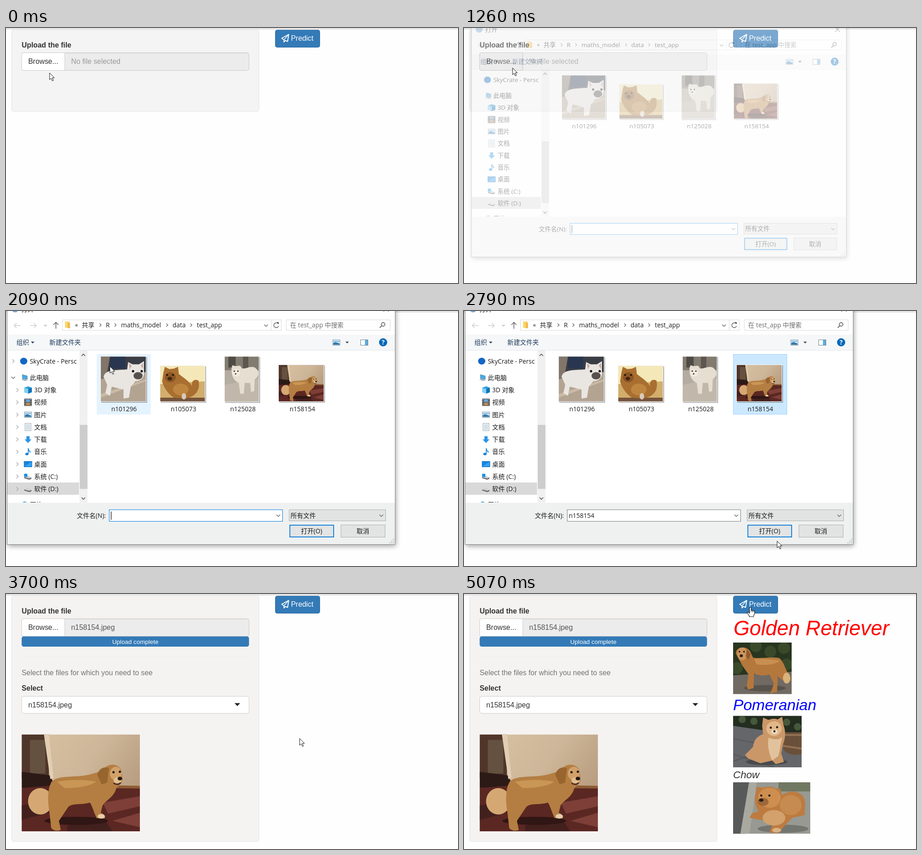
Recreate the animation shown at these times as an HTML page. Size 996 by 562 pixels, loop 9.05 s.

```html
<!DOCTYPE html>
<html lang="en">
<head>
<meta charset="utf-8">
<title>Dog breed predictor</title>
<style>
html, body { margin: 0; width: 100%; height: 100%; overflow: hidden; background: #fefefe; }
#stage { display: block; width: 100%; height: 100%; }
text { white-space: pre; }
.page { font-family: "Liberation Sans", Arial, sans-serif; font-size: 15.88px; fill: #333; }
.win { font-family: "Open Sans", "Noto Sans CJK SC", "Noto Sans CJK", sans-serif; font-size: 13.9px; fill: #1a1a1a; }
</style>
</head>
<body>
<svg id="stage" viewBox="0 0 996 562" xmlns="http://www.w3.org/2000/svg"></svg>
<script>
const LOOP = 9050;
const rect = (x, y, w, h, fill, more = '') =>
  `<rect x="${x}" y="${y}" width="${w}" height="${h}" fill="${fill}" ${more}/>`;
const text = (x, y, s, more = '') => `<text x="${x}" y="${y}" ${more}>${s}</text>`;
const shape = (d, fill, more = '') => `<path d="${d}" fill="${fill}" ${more}/>`;
const stroke = (d, color, w = 1, more = '') => shape(d, 'none', `stroke="${color}" stroke-width="${w}" ${more}`);
const oval = (x, y, rx, ry, fill, more = '') =>
  `<ellipse cx="${x}" cy="${y}" rx="${rx}" ry="${ry}" fill="${fill}" ${more}/>`;
const group = (id, body, more = '') => `<g id="${id}" ${more}>${body}</g>`;
const dots = (fill, r, ...pts) => pts.map(p => oval(p[0], p[1], r, r, fill)).join('');

// Simplified pictures, each in its own coordinate box
const pics = {
  bulldog: [99, 98,
    rect(0, 0, 99, 98, '#b3a391') + shape('M0 0H99V34L0 44Z', '#3b3d45') + rect(20, 0, 34, 26, '#29364f') +
    shape('M0 0H20L12 46 0 50Z', '#82766a') + shape('M0 82L99 50V54L0 90Z', '#c9baa5') +
    shape('M6 44C10 28 34 30 58 28L60 12 70 17 84 17 95 10 95 32C97 46 88 54 76 54L66 66 62 90 50 92 50 72 24 66 20 86 10 80 14 62Z', '#e9e6e2') +
    shape('M62 15L68 20 64 28ZM93 14L88 20 93 27Z', '#c9a6a0') + oval(82, 42, 10, 8, '#57504f') + dots('#15110f', 2.6, [71, 32], [90, 32])],
  spitz: [98, 78,
    rect(0, 0, 98, 78, '#f4e8b8') + shape('M0 40L98 34V78H0Z', '#d2ae6c') + rect(0, 70, 98, 8, '#76533a') +
    shape('M7 14L10 2 20 7 30 6 39 2 41 18C54 28 64 34 70 45 68 34 74 28 84 32 88 48 82 62 68 68L56 72 30 70C20 64 8 50 4 34Z', '#a96f30') +
    oval(22, 25, 12, 11, '#8b5524') + oval(45, 52, 17, 13, '#bd853f') + oval(21, 28, 5, 4, '#412515') + dots('#160d08', 2, [15, 20], [28, 20]) + oval(52, 67, 5, 7, '#d8caba')],
  samoyed: [75, 99,
    rect(0, 0, 75, 99, '#b4aca0') + rect(0, 0, 75, 30, '#827b70') + rect(8, 0, 16, 24, '#4e4b45') + rect(40, 0, 12, 26, '#5c564e') +
    shape('M0 62L75 48V99H0Z', '#c1b8ab') +
    shape('M15 25L17 19 24 21 34 20 38 26C48 28 54 20 66 24 78 32 76 44 66 50L65 76 58 78 56 58 44 58 42 82 34 82 31 58C20 54 14 42 15 25Z', '#e6ded0') +
    oval(25, 36, 9, 8, '#f1eade') + dots('#2a2420', 1.6, [21, 32], [29, 32], [24, 38])],
  home: [260, 213,
    rect(0, 0, 260, 213, 'url(#wall)') + rect(0, 0, 60, 95, '#50352a') + rect(18, 12, 34, 74, '#65513f') +
    shape('M0 82L62 90 76 118H0Z', '#2c1a17') + shape('M49 0H60L70 96 63 98Z', '#e2cfb3') +
    shape('M0 118L70 112 260 117V213H0Z', '#5b2722') + shape('M68 109L260 113V119L68 116Z', '#8e5c36') +
    shape('M178 150L260 136V158L190 174ZM200 190L260 172V204Z', '#7d3f37') + shape('M0 156L60 148V172L0 188ZM100 200L180 185 200 213H100Z', '#42201e') +
    oval(120, 190, 70, 9, '#301614') + oval(41, 147, 27, 29, '#d5a873') +
    shape('M178 80C186 62 214 62 220 80L222 100C220 112 208 114 207 122 200 140 186 144 178 156L174 172Q187 178 182 185L165 184C158 170 155 156 150 150 130 156 112 150 102 160L82 190 86 210Q74 215 65 206L61 170C57 150 56 120 66 104 80 88 120 96 150 88Z', '#b47e42') +
    shape('M78 104Q122 96 164 104 144 118 94 118Z', '#c99655') + shape('M166 88Q174 68 192 74L188 106 176 110Z', '#98652f') +
    oval(207, 86, 13, 15, '#d1a169') + oval(211, 101, 9, 7, '#dfbd90') + oval(175, 180, 8, 5, '#e6cfad') +
    dots('#21130e', 2.5, [202, 83], [216, 82]) + oval(216, 97, 5, 4, '#241713') + stroke('M202 107Q211 113 218 106', '#512b25', 3)],
  golden: [129, 113,
    rect(0, 0, 129, 113, '#28351f') + dots('#394a2b', 13, [50, 8], [82, 20], [112, 12], [118, 48], [8, 56]) + shape('M0 72L129 64V113H0Z', '#716a62') +
    oval(70, 100, 46, 7, '#59534d') +
    shape('M6 24C6 8 30 6 38 20L44 33C64 36 84 30 102 34 112 42 114 58 126 76 130 88 120 90 108 82L98 74 97 108 82 112 90 90 80 70C66 74 56 72 46 68L45 100 33 103 30 96 34 70 20 50Z', '#b5783c') +
    shape('M46 36Q76 34 104 40 86 52 52 48Z', '#c98f51') + oval(118, 78, 8, 12, '#d9b27a') + oval(20, 25, 11, 14, '#cb955a') +
    shape('M30 15L39 25 34 38 28 30Z', '#935a2b') + dots('#22150f', 1.9, [14, 20], [24, 20]) + oval(18, 29, 3.5, 3, '#2a1a14')],
  pomeranian: [151, 113,
    rect(0, 0, 151, 113, '#65666a') + shape('M0 0H151V40L70 32 0 22Z', '#232d20') + dots('#45583a', 8, [20, 8], [46, 12], [118, 14], [142, 24]) +
    stroke('M0 50L151 80M0 84L90 113M0 100L150 46', '#55565a', 2) + shape('M108 36H151V84Q128 90 112 76Z', '#6a503a') + stroke('M108 42H151M110 66L151 72', '#927254', 4) +
    oval(74, 101, 46, 7, '#494a4d') +
    shape('M64 22L66 4 78 9Q90 4 98 8L108 2 111 20C116 34 116 48 110 62L106 82 112 101 94 106 86 98 60 104 34 94 26 86 44 68C46 50 56 44 66 40Z', '#ca9768') +
    shape('M78 48Q100 56 108 46L100 88 86 98Q74 72 78 48Z', '#e1c29d') + oval(90, 28, 17, 16, '#e1b789') + oval(91, 35, 7, 5, '#eedac0') +
    dots('#1a1411', 2.3, [83, 26], [97, 25], [91, 34])],
  chow: [170, 113,
    rect(0, 0, 170, 113, '#979992') + shape('M0 0H50L26 113H0Z', '#575a59') + shape('M35 0H52L36 113H16Z', '#aaa9a0') + rect(100, 0, 70, 20, '#707762') +
    oval(110, 102, 56, 9, '#73756f') +
    shape('M50 24L52 10 66 12Q82 6 94 14L104 14 108 28C122 18 146 16 156 34 162 50 156 62 158 72L130 78C118 90 108 104 96 112L80 110 88 90 68 84 36 78 42 68 56 64C48 52 46 38 50 24Z', '#bd7b40') +
    oval(80, 34, 25, 22, '#cd8e4f') + oval(127, 50, 24, 22, '#c68b51') + oval(90, 78, 25, 17, '#d2a16c') + oval(66, 43, 12, 9, '#9d6739') +
    oval(62, 39, 5, 3.5, '#251b17') + dots('#1e1713', 2.3, [62, 29], [80, 29]) + oval(96, 105, 10, 5, '#d9b185')]
};
function pic(name, x, y, w, h) {
  const [vw, vh, body] = pics[name];
  return `<svg x="${x}" y="${y}" width="${w}" height="${h}" viewBox="0 0 ${vw} ${vh}" preserveAspectRatio="none">${body}</svg>`;
}

const plane = shape('M607.5 22.5L623 14 620.5 29.5 615.5 27.5 612.5 31V26Z', 'none', 'stroke="#fff" stroke-width="1.9" stroke-linejoin="round"') +
  stroke('M612.5 26L622 15', '#fff', 1.6);
const bold = 'font-weight="bold"';

const page =
  rect(0, 0, 996, 3, '#f0f0f0') + rect(0, 1.5, 996, 1.5, '#d6d6d6') +
  rect(12.5, 4.5, 545, 179, '#f4f4f4', 'id="panel" rx="4" stroke="#e3e3e3"') +
  text(34.5, 42.5, 'Upload the file', bold) +
  rect(34.5, 54.5, 501, 39, '#ececec', 'rx="4" stroke="#c8c8c8"') + stroke('M131 56H534', '#dedede') +
  shape('M129.5 54.5H39Q34.5 54.5 34.5 59V89Q34.5 93.5 39 93.5H129.5Z', '#fff', 'id="browse" stroke="#ccc"') +
  text(49, 79, 'Browse...') + text(143.5, 79, 'No file selected', 'id="fileName" fill="#999"') +
  group('progress', rect(34.5, 93.5, 501, 22.5, '#337ab7', 'rx="4.5"') +
    text(285, 109.7, 'Upload complete', 'id="done" text-anchor="middle" font-size="13.6" fill="#fff"')) +
  group('details', stroke('M35 139.5H535', '#ececec') +
    text(34.5, 179, 'Select the files for which you need to see', 'fill="#737373"') + text(34.5, 213.3, 'Select', bold) +
    rect(34.5, 225.5, 501, 37.5, '#fff', 'rx="4" stroke="#ccc"') + text(49, 250, 'n158154.jpeg') +
    shape('M503.5 240.5H516L509.8 247Z', '#222') + pic('home', 34.5, 309.5, 260.5, 213.5)) +
  rect(593.5, 4.5, 98, 38, '#337ab7', 'id="predict" rx="4" stroke="#2e6da4"') + plane + text(628, 28, 'Predict', 'fill="#fff"') +
  group('results',
    text(594, 90.5, 'Golden Retriever', 'font-size="45.36" fill="#f00"') + pic('golden', 593, 107, 129, 113.5) +
    text(593, 256, 'Pomeranian', 'font-size="34" fill="#00f"') + pic('pomeranian', 593, 268.5, 151, 113.5) +
    text(593, 405.7, 'Chow', 'font-size="22.7"') + pic('chow', 593, 415, 170, 113.5), 'font-style="italic"');

// Dialog parts
const chev = (x, y, c, s = 4, w = 1.3) => stroke(`M${x - s / 2} ${y - s}l${s} ${s}l${-s} ${s}`, c, w);
const chevDown = (x, y, c, s = 4, w = 1.2) => stroke(`M${x - s} ${y - s / 2}l${s} ${s}l${s} ${-s}`, c, w);
const arrow = (x, y, turn, c) => stroke('M-7 0H7M-1.5 -5.5L-7 0L-1.5 5.5', c, 1.4, `transform="translate(${x} ${y}) rotate(${turn})"`);
const photoIcon = (x, y) => rect(x, y, 16, 12, '#eaf4fb', 'stroke="#8b9aa5"') + shape(`M${x + 1} ${y + 11}V${y + 7}L${x + 6} ${y + 5}L${x + 15} ${y + 8}V${y + 11}Z`, '#3478a8') + rect(x + 1, y + 2, 14, 3, '#83c2ee');
const drive = y => shape(`M40 ${y + 1}L47 ${y - 2}L56 ${y + 2}V${y + 5}L51 ${y + 7}L40 ${y + 3}Z`, '#cfcfcf') + shape(`M40 ${y + 1.5}L51 ${y + 4.5}L56 ${y + 2.5}V${y + 5}L51 ${y + 7}L40 ${y + 3.5}Z`, '#626262');
const monitor = y => shape(`M36 ${y - 7}L47 ${y - 4}V${y + 4}L36 ${y + 2}Z`, '#48a7e4', 'stroke="#6a8799" stroke-width=".8"') + shape(`M33 ${y + 4}L39 ${y + 3}L48 ${y + 6}L42 ${y + 7}Z`, '#9aa7af');

const rows = [
  ['3D 对象', y => shape(`M40 ${y - 5}L49 ${y - 8}L57 ${y - 5}V${y + 5}L49 ${y + 8}L40 ${y + 5}Z`, '#2c9edb') + shape(`M40 ${y - 5}L49 ${y - 2}V${y + 8}L40 ${y + 5}Z`, '#83d0f3') + shape(`M49 ${y - 2}L57 ${y - 5}V${y + 5}L49 ${y + 8}Z`, '#1274b5')],
  ['视频', y => rect(40, y - 8, 17, 16, '#3c3c3c') + rect(44, y - 7, 9, 6.5, '#6aa6d8') + rect(44, y + .5, 9, 6.5, '#b98b5c') + stroke(`M42 ${y - 7}V${y + 8}M55 ${y - 7}V${y + 8}`, '#eee', 1.6, 'stroke-dasharray="2 2"')],
  ['图片', y => photoIcon(40.5, y - 6)],
  ['文档', y => rect(42, y - 8, 13, 16, '#fff', 'stroke="#8a9aa6"') + stroke(`M44 ${y - 4.5}h9M44 ${y - 1.5}h9M44 ${y + 1.5}h9M44 ${y + 4.5}h9`, '#7fa5c0')],
  ['下载', y => shape(`M45 ${y - 7}h7v7h4l-7.5 8l-7.5 -8h4Z`, '#2b94e6')],
  ['音乐', y => oval(46, y + 5, 3.6, 2.8, '#1683d8') + stroke(`M49 ${y + 5}V${y - 8}Q49 ${y - 3} 53 ${y - 1}V${y + 2}`, '#1683d8', 1.8)],
  ['桌面', y => rect(40, y - 6, 17, 12, '#1586e0', 'stroke="#1269b4"') + shape(`M41 ${y + 5}L56 ${y - 5}V${y + 5}Z`, '#37a3f4')],
  ['系统 (C:)', y => drive(y) + rect(40, y - 6, 7, 7, '#1690e5')],
  ['软件 (D:)', drive]
];
const rowY = i => 174 + 27.25 * i;

const nav =
  rect(4, 96.5, 157, 27, '#e5f3ff', 'id="rowHover"') + rect(3, 378, 158, 27, '#d9d9d9') +
  oval(39, 110.5, 8, 7.5, '#1267c4') + text(52.5, 115.5, 'SkyCrate - Persc') +
  monitor(147) + text(52.5, 152, '此电脑') +
  rows.map(([name, icon], i) => icon(rowY(i)) + text(62, rowY(i) + 5, name)).join('') +
  oval(41, 426, 6, 6, '#3f97cf') + text(52.5, 432, '网络') +
  group('chevrons', chev(16, 110.5, '#a6a6a6') + chevDown(16, 147, '#555') + rows.map((r, i) => chev(25, rowY(i), '#a6a6a6')).join(''));

const files = [
  ['n101296', 'bulldog', 209, 100.5, 99, 98.5], ['n105073', 'spitz', 340, 121, 98, 78],
  ['n125028', 'samoyed', 482, 100.5, 75, 99], ['n158154', 'home', 601, 119, 99, 80]
];
const fileX = i => 200.5 + 131 * i;
const items = files.map(([name, p, x, y, w, h], i) =>
  rect(fileX(i), 95.5, 118, 132, '#e5f3ff', `id="item${i}" stroke="#e5f3ff"`) +
  rect(x + 1, y + 1, w + 2, h + 2, '#000', 'opacity=".3"') + rect(x - 1, y - 1, w + 2, h + 2, '#f4f4f4') +
  pic(p, x, y, w, h) + text(fileX(i) + 59.5, 220.7, name, 'text-anchor="middle"')).join('');

const crumbs = [[167, '共享'], [220, 'R'], [253.5, 'maths_model'], [367, 'data'], [420.5, 'test_app']];
const grip = [[854, 503], [854, 507], [854, 511], [850, 507], [850, 511], [846, 511]].map(p => rect(p[0] - 1, p[1] - 1, 2, 2, '#b0b0b0')).join('');

const dialog =
  rect(3, -20, 855, 534, '#000', 'filter="url(#shadow)" opacity=".38"') +
  rect(2.5, -20.5, 855, 535, '#fff', 'stroke="#858585"') +
  oval(20, -5, 8, 8, '#76a9d8') + text(34, 1, '打开') + stroke('M832 -10l11 11M843 -10l-11 11', '#333', 1.1) +
  arrow(25, 32, 0, '#ccc') + arrow(60, 32, 180, '#ccc') + chevDown(87, 32, '#aaa', 3) + arrow(110, 32, 90, '#555') +
  rect(124.5, 19.5, 482, 23, '#fff', 'stroke="#d9d9d9"') + stroke('M584.5 20V42', '#d9d9d9') +
  rect(130, 23, 10, 14, '#fbd56f') + rect(136, 26, 5, 12, '#eeb94a') + text(152, 35, '«', 'font-size="13"') +
  crumbs.map(([x, s]) => text(x, 35.5, s)).join('') + [208, 241, 355, 408].map(x => chev(x, 31, '#555', 3.5, 1.1)).join('') +
  chevDown(573, 32, '#555') + stroke('M599 27.5A5.3 5.3 0 1 0 600.5 33', '#555', 1.4) + shape('M596 24.5h5v5Z', '#555') +
  rect(617.5, 19.5, 229, 23, '#fff', 'stroke="#d9d9d9"') + text(626, 36, '在 test_app 中搜索', 'fill="#6b6b6b"') +
  oval(831, 29.5, 4, 4, 'none', 'stroke="#444" stroke-width="1.4"') + stroke('M828 32.5L823.5 37', '#444', 1.6) +
  rect(3, 52, 854, 34, '#f5f7f8') + stroke('M3 86.5H857', '#e3e6e8') +
  text(23, 74.3, '组织', 'fill="#1e395b"') + shape('M55 67.5h7.5l-3.75 4Z', '#1e395b') + text(95.5, 74.3, '新建文件夹', 'fill="#1e395b"') +
  photoIcon(720, 63.5) + shape('M748 67.5h7.5l-3.75 4Z', '#444') +
  rect(781.5, 63.5, 16, 12, '#fff', 'stroke="#6b7f8d"') + rect(791, 64, 6, 11, '#5aabe2') + oval(831, 69, 9, 9, '#0068b8') +
  text(831, 73.8, '?', 'text-anchor="middle" font-weight="bold" fill="#fff"') +
  `<g clip-path="url(#navClip)">${nav}</g>` +
  rect(162, 87, 17.5, 335, '#f0f0f0') + rect(162.5, 251, 17, 141, '#cdcdcd') + chevDown(170.5, 413, '#555', 4, 1.6) + stroke('M166.5 99l4 -4l4 4', '#555', 1.6) +
  items +
  rect(3, 422.5, 854, 91, '#eff1f1') + text(220, 456, '文件名(N):', 'text-anchor="end"') +
  rect(227.5, 438, 382, 25.5, '#fff', 'id="field" stroke="#0078d7"') + chevDown(600, 451, '#555') +
  rect(231, 442, 1.2, 18, '#000', 'id="caret"') + rect(230.5, 442, 58, 18, '#0078d7', 'id="marked"') + text(231, 456, 'n158154', 'id="typed"') +
  rect(624, 438, 212.5, 24.5, '#e2e3e3', 'stroke="#adadad"') + text(627, 455.5, '所有文件') + chevDown(827, 451, '#555') +
  rect(625.5, 472, 96.5, 26, '#e2e4e5', 'id="open" stroke="#0078d7" stroke-width="1.8"') + text(673.5, 490, '打开(O)', 'text-anchor="middle"') +
  rect(738, 471.5, 97.5, 27, '#e2e3e3', 'stroke="#adadad"') + text(786.5, 490, '取消', 'text-anchor="middle"') + grip;

const pointers =
  group('arrowPtr', shape('M0 0V15L3.5 11.7 6 17.5 8.5 16.4 6 10.8H10.6Z', '#fff', 'stroke="#111"')) +
  group('handPtr', shape('M-1.8 1.5Q0 -1 1.8 1.5V7Q4 6 5 8 7 7 8 9 10 8.5 9.5 11.5 9.5 16 7 19V21H-2.5V19Q-5 16 -7 12.5 -6 9.5 -3.5 12L-1.8 13.5Z', '#fff', 'stroke="#111" stroke-width="1.1" stroke-linejoin="round"') + stroke('M1.8 7V11M5 8V11.5', '#111', .9));

document.getElementById('stage').innerHTML =
  `<defs><filter id="shadow" x="-10%" y="-10%" width="120%" height="120%"><feOffset dx="1" dy="4"/><feGaussianBlur stdDeviation="6"/></filter>
  <clipPath id="navClip"><rect x="3" y="87" width="158" height="335"/></clipPath>
  <linearGradient id="wall" x1="0" y1="0" x2="1" y2=".6"><stop offset="0" stop-color="#d9c3a4"/><stop offset=".55" stop-color="#cdb699"/><stop offset="1" stop-color="#b69a7d"/></linearGradient></defs>` +
  rect(0, 0, 996, 562, '#fefefe') + group('page', page, 'class="page"') + group('dialog', dialog, 'class="win"') + group('pointer', pointers);

const el = {};
document.querySelectorAll('[id]').forEach(e => el[e.id] = e);
const set = (id, attrs) => { for (const k in attrs) el[id].setAttribute(k, attrs[k]); };
const show = (id, on) => set(id, { opacity: +on });

// Keys are [time, ...values], joined by straight segments
function track(keys, t) {
  const i = keys.findIndex(k => k[0] > t);
  if (i === 0) return keys[0].slice(1);
  if (i < 0) return keys[keys.length - 1].slice(1);
  const [a, b] = [keys[i - 1], keys[i]], f = (t - a[0]) / (b[0] - a[0]);
  return a.slice(1).map((v, j) => v + (b[j + 1] - v) * f);
}
const path = [
  [380, 96, 99], [940, 107, 88], [1260, 107, 88], [1460, 134, 102], [1810, 140, 106], [2020, 158, 114], [2160, 300, 130],
  [2370, 620, 158], [2510, 655, 165], [2580, 655, 168], [2790, 690, 507], [2930, 680, 492], [3070, 674, 486],
  [3490, 674, 486], [3980, 611, 95], [4050, 613, 88], [4470, 630, 29], [4800, 630, 29], [4870, 631, 29]
];
const fade = [[1259, 0, .95], [1260, .35, .966], [1390, .88, .993], [1460, 1, 1], [3350, 1, 1], [3420, .33, .966], [3490, 0, .95]];
const chevFade = [[1320, 0], [1460, 1], [2230, 1], [2510, 0]];

const snap = (t, from) => from + 70 * Math.floor((t - from) / 70);
const stepTime = t => t < 1260 ? snap(t, 450) : t < 1320 ? 1260 : t < 4800 ? snap(t, 1320) : t;

function draw(now) {
  const t = stepTime(now);
  const [x, y] = track(path, t), [alpha, size] = track(fade, t);
  const picked = t >= 2510, sent = t >= 3350, full = t >= 3700;
  const inside = (l, u, r, d) => x >= l && x <= r && y >= u && y <= d;

  set('panel', { height: full ? 541 : 179, fill: full ? '#f5f3f2' : '#f4f4f4' });
  const dark = t >= 660 && !full;
  set('browse', { fill: dark ? '#e6e6e6' : '#fff', stroke: dark ? '#adadad' : '#ccc' });
  el.fileName.textContent = sent ? 'n158154.jpeg' : 'No file selected';
  set('fileName', { fill: sent ? '#555' : '#999' });
  show('progress', t >= 3560);
  show('details', full);
  set('predict', { fill: now >= 4800 && now < 4870 ? '#286090' : '#337ab7' });
  show('results', now >= 5070);

  set('dialog', { opacity: alpha, transform: `translate(${412 * (1 - size)} ${218 * (1 - size)}) scale(${size})` });
  el.dialog.style.display = alpha > 0 ? '' : 'none';
  show('rowHover', t > 1320 && inside(3, 96, 161, 124));
  set('chevrons', { opacity: track(chevFade, t)[0] });
  files.forEach((f, i) => {
    const chosen = i === 3 && picked;
    show('item' + i, chosen || inside(fileX(i), 95, fileX(i) + 118, 227));
    if (i === 3) set('item3', { fill: sent ? '#d9d9d9' : chosen ? '#cce8ff' : '#e5f3ff', stroke: sent ? '#d9d9d9' : chosen ? '#99d1ff' : '#e5f3ff' });
  });
  set('field', { stroke: picked ? '#7a7a7a' : '#0078d7' });
  show('caret', !picked);
  show('typed', picked);
  show('marked', sent);
  set('typed', { fill: sent ? '#fff' : '#1a1a1a' });
  set('open', { fill: inside(625, 471, 722, 498) ? '#e5f1fb' : '#e2e4e5' });

  const hand = (t >= 1390 && t < 1600) || (t > 4050 && inside(593, 0, 692, 43));
  show('handPtr', hand);
  show('arrowPtr', !hand);
  set('pointer', { transform: `translate(${x} ${y})` });
}

const start = performance.now();
function tick() {
  draw((performance.now() - start) % LOOP);
  requestAnimationFrame(tick);
}
tick();
</script>
</body>
</html>
```
